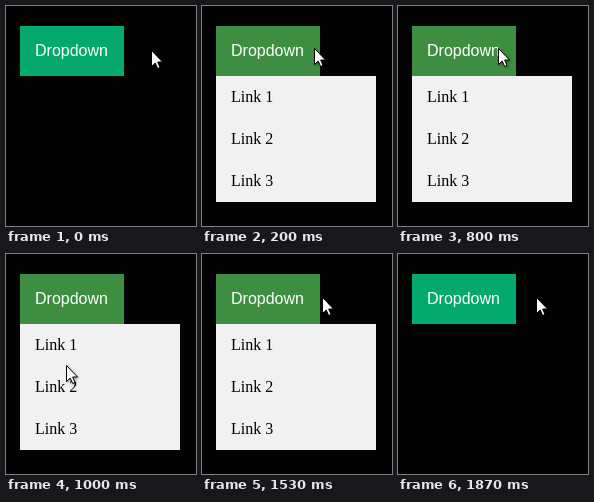
Write an HTML page that moves like this. It is 190 px wide and 220 px high and loops after 1940 ms.

```html
<!DOCTYPE html>
<html lang="en">
<head>
<meta charset="utf-8">
<style>
html, body { margin: 0; width: 100%; height: 100%; overflow: hidden; background: #030303; }
#button {
  position: absolute; left: 14px; top: 20px; width: 104px; height: 50px;
  box-sizing: border-box; padding: 16px 0 0 15px; background: #04aa6d; color: #fff;
  font: 16px/18px Arial, "Liberation Sans", sans-serif;
}
#menu {
  position: absolute; left: 14px; top: 70px; width: 160px; background: #f1f1f1; color: #000;
  font: 16px/18px "Times New Roman", "Liberation Serif", serif;
}
#menu div { padding: 12px 15px; }
.open #button { background: #3e8e41; }
body:not(.open) #menu { display: none; }
#cursor {
  position: absolute; left: 0; top: 0; overflow: visible;
  filter: drop-shadow(1px 1px 1px rgba(0, 0, 0, .4));
}
</style>
</head>
<body>
<div id="button">Dropdown</div>
<div id="menu"><div>Link 1</div><div>Link 2</div><div>Link 3</div></div>
<svg id="cursor" width="13" height="20">
  <path d="M.5 .5V16.5L4.2 13L6.7 18.5L9 17.5L6.7 12H11.5Z" fill="#fff" stroke="#000"/>
</svg>
<script>
const LOOP = 1940, FPS = 15, LAST = 28;
const cursor = document.getElementById("cursor");
const lerp = (a, b, k) => a + (b - a) * k;

// Straight move from a to b, bowed towards the links by reach
function glide(a, b, k, reach = 0) {
  const bow = reach * Math.sin(Math.PI * k);
  return [lerp(a.x, b.x, k) - bow * 0.58, lerp(a.y, b.y, k) + bow];
}

const outside = { x: 145, y: 44 }, edge = { x: 112, y: 42 };
const rest = { x: 100, y: 42 }, leave = { x: 101, y: 42 }, away = { x: 138, y: 43 };

function pointAt(step) {
  if (step < 3) return glide(outside, edge, step / 3);
  if (step < 12) return glide(edge, rest, (step - 3) / 9, 118);
  if (step < 15) return glide(rest, rest, 0);
  if (step < 19) return glide(rest, leave, (step - 14) / 5, 118);
  const k = (step - 19) / 9;
  return glide(leave, away, k * (1.25 - 0.25 * k));
}

function draw(now) {
  const t = now % LOOP;
  const step = Math.min(LAST, Math.floor((t + 5) * FPS / 1000));
  const [x, y] = pointAt(step).map(Math.round);
  cursor.style.transform = `translate(${x}px, ${y}px)`;
  document.body.classList.toggle("open", step >= 3 && step < 24);
}

const start = performance.now();
function tick() {
  draw(performance.now() - start);
  requestAnimationFrame(tick);
}
tick();
</script>
</body>
</html>
```
